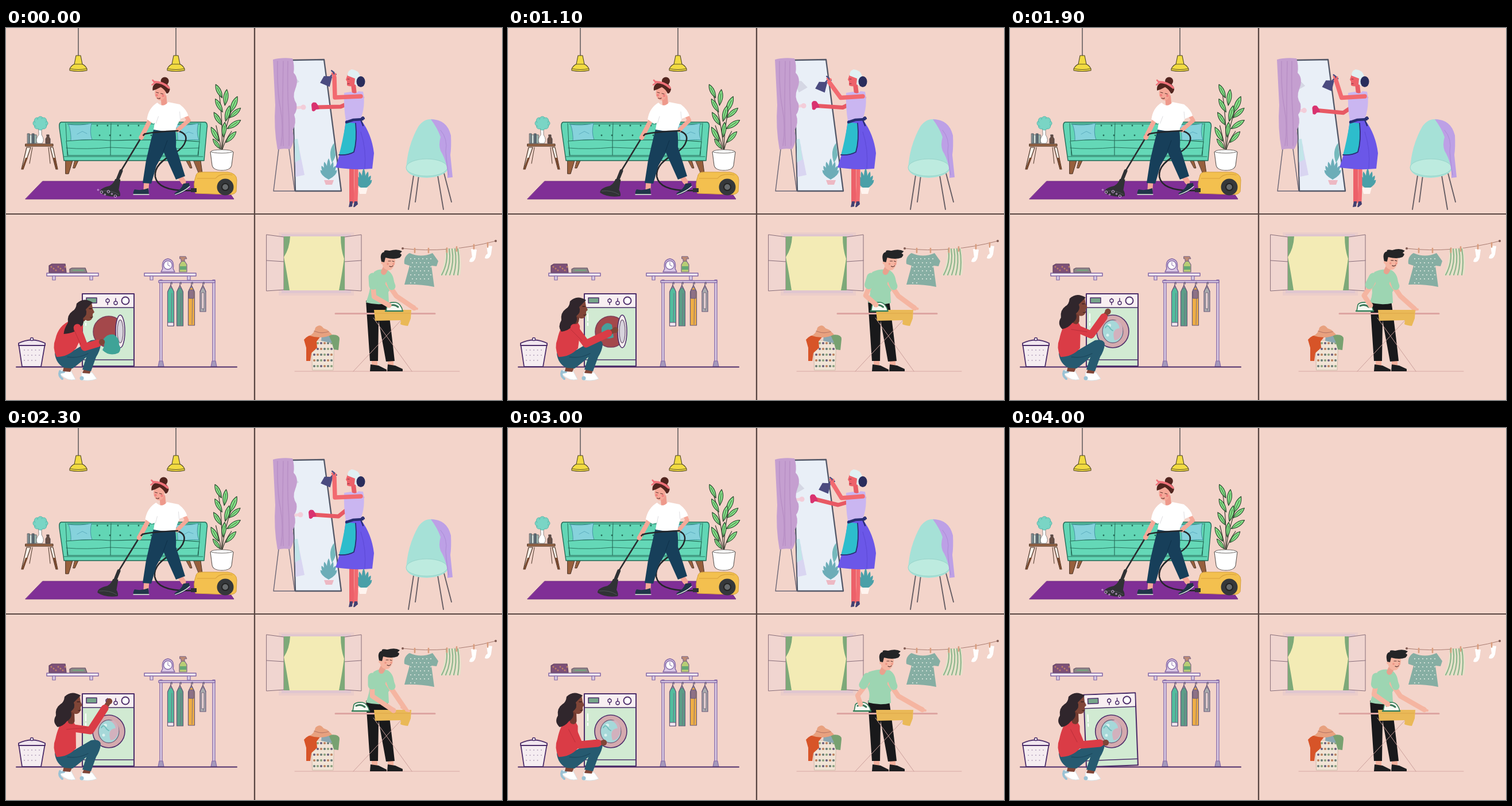
An HTML page with a canvas that plays this animation: 864x648 px, repeating every 4.1 s.

```html
<!DOCTYPE html>
<html lang="en">
<head>
<meta charset="utf-8">
<title>Housework</title>
<style>
html, body { margin: 0; width: 864px; height: 648px; overflow: hidden; background: #f3d4ca; }
canvas { display: block; }
</style>
</head>
<body>
<canvas id="stage" width="864" height="648"></canvas>
<script>
const c = document.getElementById('stage').getContext('2d');
const LOOP = 4100, STEP = 100;
const INK = '#35373c', PLUM = '#4e2f6b', LILAC = '#8468a6', SKIN = '#f5a898', NAVY = '#173f5a', MINT = '#9dd5b2';
c.lineCap = c.lineJoin = 'round';

// Drawing helpers
function path(d, fill, stroke, w = 1.2) {
  const p = new Path2D(d);
  if (fill) { c.fillStyle = fill; c.fill(p); }
  if (stroke) { c.strokeStyle = stroke; c.lineWidth = w; c.stroke(p); }
}
const line = (pts, col, w = 1.2) => path('M' + pts.join('L'), null, col, w);
const rect = (x, y, w, h, fill, stroke, sw) => path(`M${x} ${y}h${w}v${h}h${-w}Z`, fill, stroke, sw);
function oval(x, y, rx, ry, fill, stroke, w = 1.2) {
  c.beginPath();
  c.ellipse(x, y, rx, ry, 0, 0, 7);
  if (fill) { c.fillStyle = fill; c.fill(); }
  if (stroke) { c.strokeStyle = stroke; c.lineWidth = w; c.stroke(); }
}
const dot = (x, y, r, fill, stroke, w) => oval(x, y, r, r, fill, stroke, w);
function moved(x, y, draw, turn = 0) {
  c.save();
  c.translate(x, y);
  c.rotate(turn);
  draw();
  c.restore();
}
function leaf(x, y, len, turn, fill, stroke) {
  moved(x, y, () => {
    path(`M0 ${-len}Q${len * .56} ${-len * .1} 0 ${len}Q${-len * .56} ${-len * .1} 0 ${-len}Z`, fill, stroke, 1.1);
    if (stroke) line([[0, -len * .5], [0, len]], stroke, .7);
  }, turn);
}
// Slim leaves fanned out from one root
function fan(x, y, col) {
  for (let i = -3; i < 4; i++) moved(x, y, () => {
    const h = 37 - Math.abs(i) * 5;
    path(`M0 0Q-6 ${-h * .7} 0 ${-h}Q6 ${-h * .7} 0 0Z`, col);
  }, i * .24);
}
const mix = (a, b, k) => a.map((v, i) => v + (b[i] - v) * k);

// Rows are [time, ...values]
function at(t, rows) {
  let i = 0;
  while (i < rows.length - 2 && t > rows[i + 1][0]) i++;
  const [a, b] = [rows[i], rows[i + 1]];
  const k = Math.min(1, Math.max(0, (t - a[0]) / (b[0] - a[0])));
  return mix(a, b, k).slice(1);
}

function lamp(x) {
  moved(x, 0, () => {
    line([[0, 0], [0, 48]], INK, 1.2);
    path('M-4 48H4L7 63Q12 65 15 71V74Q0 77 -15 74V71Q-12 65 -7 63Z', '#f2db42', '#4c4423', 1.1);
    path('M-7 63H7M-14 71Q0 74 14 71', null, '#4c4423', .9);
  });
}

function sideTable() {
  path('M36 208H43L30 246H27ZM77 208H82L90 246H87Z', '#f7efe8', '#4b3527');
  path('M34 226H38L30 246H27ZM82 226H86L90 246H87Z', '#7a4a30');
  line([[46, 208], [41, 236]], '#4b3527', 1);
  line([[74, 208], [77, 236]], '#4b3527', 1);
  rect(34, 202, 48, 4, '#9a6746', '#4b3527', 1);
  ['#7c8d92', '#d6e5e2', '#596a75', '#9fb9b4'].forEach((col, i) =>
    rect(37.5 + i * 4, 184 + i % 2 * 2, 3.6, 17 - i % 2 * 2, col, '#4b5256', .8));
  path('M57 176H62L62 186Q68 195 63 201H55Q50 195 57 186Z', '#fff', '#71716f', .8);
  for (let i = 0; i < 8; i++) dot(60 + 8 * Math.cos(i * .785), 166 + 7 * Math.sin(i * .785), 5, '#78d3c3', '#4caea1', .7);
  dot(60, 167, 9, '#7ad5c5');
  path('M71 186H75V190L77 193V201H69V193L71 190Z', '#694f45', INK, .8);
}

function sofa() {
  const edge = '#246956', teal = '#62d6b5';
  path('M104 231H116L109 254H104ZM327 231H339L342 253H336ZM120 231H126L120 244H117ZM314 231H320L324 244H321Z', '#965f3c', '#4b3527', 1);
  path('M96 164H347Q352 166 350 175L345 231H101L93 174Q92 165 96 164Z', teal, edge, 1.4);
  path('M104 166L107 223M339 166L335 223M107 167H337M183 166L182 196', null, edge, 1);
  for (let i = 0; i < 8; i++) {
    dot(159 + i * 18, 170, 1.4, edge);
    dot(163 + i * 18, 187, 1.4, edge);
  }
  const pillow = x => path(`M${x} 168Q${x + 20} 171 ${x + 40} 166Q${x + 36} 181 ${x + 41} 195Q${x + 22} 193 ${x + 4} 199Q${x + 5} 182 ${x} 168Z`, '#86d2dc', '#4597a5', 1);
  pillow(109);
  pillow(295);
  path('M124 185l9 -5 8 4M309 186l9 -5 8 3', null, '#5daec0', 1);
  path('M105 197Q145 193 182 196V222H108ZM182 196Q285 193 337 198L334 222H182Z', '#64d8b7', edge, 1.1);
  path('M105 209Q140 212 182 208M182 208Q260 212 336 209M101 224H343', null, edge, .9);
}

function plant(t) {
  const sway = -16 * (.5 - .5 * Math.cos((t - 50) / 2050 * Math.PI * 2));
  const bend = (x, y) => [x + sway * Math.pow((213 - y) / 108, 1.3), y];
  const stem = (x, y, m) => {
    const [a, b] = bend(x, y), [p, q] = bend(m, (y + 213) / 2);
    path(`M376 214Q${p} ${q} ${a} ${b}`, null, '#3d3d32', 1.2);
  };
  stem(371, 110, 378); stem(398, 130, 381); stem(366, 170, 371); stem(393, 180, 381);
  [[371, 110, 13, -.45], [383, 121, 14, .12], [397, 133, 15, .42], [371, 135, 13, -.5],
   [386, 149, 14, .25], [399, 148, 13, .85], [369, 158, 13, -.55], [397, 168, 14, 1],
   [380, 177, 13, .1], [364, 185, 14, -.5], [392, 190, 13, .75], [367, 202, 11, -.65]]
    .forEach(([x, y, n, r]) => leaf(...bend(x, y), n, r, '#85e287', '#28462d'));
  path('M356 216Q376 209 396 216L393 239Q391 248 376 248Q361 248 359 239Z', '#fff', '#5c5653', 1.1);
  oval(376, 215, 19, 3, '#fff', '#5c5653', .9);
}

function vacuuming(t) {
  const [k] = at(t % 2050, [[0, .73], [250, .5], [600, 0], [950, .3], [1350, .98], [1600, 1], [1950, .76], [2050, .73]]);
  const s = 9 * k, hand = [224 + 16 * k, 192 - 2 * k], nx = 17 * k;
  path('M64 267H375L397 298H34Z', '#802f96', '#6b2883', 1);
  path(`M${294 + 6 * k} 179C${312 + 18 * k} 185 ${304 + 10 * k} 207 ${288 + 10 * k} 217C${266 + 8 * k} 230 ${255 + 4 * k} 242 ${257 + 4 * k} 259Q${262 + 4 * k} 286 328 283`, null, '#24262a', 2.6);

  path('M331 257Q332 251 340 251H386Q402 253 402 265L401 285Q398 291 386 290L330 288Q325 272 331 257Z', '#f3c04f', '#d49f3d', 1);
  path('M333 262H365Q372 252 394 256', null, '#d9a23c', 1.2);
  dot(382, 277, 14.5, '#35383b');
  dot(382, 277, 6, '#666a6c', '#222', 2);
  rect(322, 279, 10, 7, '#303235');

  line([[245, 265], [244, 281]], SKIN, 9);
  line([[302, 257], [309, 268]], SKIN, 9);
  path('M224 281Q235 284 248 279L249 291H222Q221 285 224 281Z', '#203649');
  path('M293 288Q306 281 309 271L319 270L320 276Q310 288 296 291Z', '#203649');
  path('M222 290H249M295 290Q310 285 320 276', null, '#f3f3ee', 1.3);
  path(`M${256 + s * .2} 176H${294 + s * .1}Q297 191 296 207L312 258L296 264L275 217L262 240L253 271L238 270L244 231Q250 204 ${256 + s * .2} 176Z`, NAVY);
  line([[274, 215], [281, 196]], '#0e3049', 1);

  line([[305 + s, 150], [308 + 14 * k, 161], [296 + 4 * k, 178]], SKIN, 7);
  line([[243 + 12 * k, 159], hand], SKIN, 8);
  moved(s, 0, () => line([[268, 120], [269, 133]], '#ee998b', 10));
  path(`M${257 + s} 130Q${267 + s} 140 ${276 + s} 129L${296 + s} 133Q${308 + s} 142 ${311 + s} 153L${298 + s} 158Q297 169 295 179Q275 181 257 177L259 165L${248 + 12 * k} 167L${236 + 13 * k} 159Q${241 + 10 * k} 139 ${257 + s} 130Z`, '#fff');
  path(`M${296 + s} 146L${297 + s} 158M${258 + s * .5} 166L${259 + s} 154`, null, '#dedde0', 1);
  moved(s, 0, () => {
    dot(270, 92.5, 7, '#52251f');
    oval(262, 113, 9.5, 13, SKIN);
    path('M249 109Q247 96 262 94Q277 95 279 107Q277 115 273 114Q270 107 263 103Q256 107 249 109Z', '#52251f');
    path('M252 94Q267 94 277 104', null, '#f0727a', 3.8);
    path('M253 95L249 91M252 96L248 99', null, '#f0727a', 2.6);
    path('M255 112l4 1M263 114l4 1M257 122q3 2 5 0', null, '#633531', 1.1);
    dot(256, 117, 2.3, '#ef817f');
    dot(267, 118, 2.3, '#ef817f');
  });
  const grip = [hand[0] + 6, hand[1] - 6], neck = [186 + nx, 252];
  path(`M${grip}Q${250 + 10 * k} 181 ${298 + 2 * k} 179`, null, '#24262a', 2.6);
  line([grip, hand, neck], '#2b2d30', 2.6);
  dot(...hand, 4.2, SKIN);
  line([[neck[0] + 2, 249], [neck[0] - 4, 264]], '#303235', 6);
  moved(nx, 0, () => {
    path('M178 263L187 264L184 282Q188 289 186 293Q165 296 151 287Q150 280 164 276Q173 275 178 263Z', '#303235');
    path('M154 284Q171 282 184 290', null, '#515459', 1);
  });
  if (k > .6) for (let i = 0; i < 6; i++)
    dot(148 + nx + i * 6, 282 + i % 3 * 3 + i, 1.2 + i % 2, null, '#d9b1e5', 1);
}

function mirror(t) {
  path('M475 211L466 284H505M493 211L503 284', null, '#686474', 1.4);
  path('M498 56L554 55L584 284H504Z', '#e9eff7', '#535868', 2.3);
  const [gx, gy, ax, ay, bx, by, hx, hy, sx, sy] = at(t, [
    [0, 537, 138, 583, 137, 573, 121, 572, 86, 560, 91],
    [600, 537, 133, 584, 134, 578, 121, 555, 94, 543, 99],
    [1600, 531, 138, 582, 143, 581, 122, 565, 96, 553, 103],
    [2300, 532, 151, 579, 154, 573, 121, 572, 86, 561, 92],
    [3000, 531, 124, 575, 134, 581, 122, 565, 96, 554, 103],
    [3400, 529, 104, 568, 123, 580, 120, 566, 96, 556, 104],
    [4000, 535, 134, 582, 136, 575, 121, 570, 88, 559, 94]]);
  c.save();
  c.clip(new Path2D('M499 57L553 56L582 283H505Z'));
  path('M500 197Q510 194 511 211L520 256L501 260Z', '#d9d5f1');
  path('M498 195L508 193L513 229L500 236Z', '#c2e5e9');
  line([[490, gy + 3], [gx - 22, gy]], '#f3d3dc', 5);
  dot(gx - 19, gy, 4.5, '#f3cdd9');
  moved(514 - (sx - 543) * .9, sy, () => path('M-8 -11L4 -8L11 6L-6 10Z', '#d5d7e4'), -.3);
  fan(562, 264, '#6cadb8');
  leaf(570, 217, 18, .12, '#75b9bc');
  path('M554 265H571L568 273H557Z', '#edb8c3');
  c.restore();
  path('M465 55Q479 51 499 53Q503 65 501 78Q511 88 504 106Q498 120 506 132Q508 143 502 151Q507 165 499 179Q504 197 495 211Q482 209 473 212Q466 174 469 134Z', '#c59fd0');
  [[473, 478], [483, 482], [491, 492]].forEach(([x, y]) =>
    path(`M${x} 58Q${x - 1} 109 ${y} 140T${y + 1} 205`, null, '#b990c6', 1.6));

  fan(623, 281, '#4aa0a8');
  path('M613 278H630L627 289H616Z', '#fff4ef');
  line([[602, 240], [602, 275], [602, 302]], '#ec6069', 8);
  line([[610, 240], [610, 275], [609, 302]], '#f26a70', 7);
  path('M599 302L604 302L603 311L597 312ZM607 302H612L613 307L607 312H605Z', '#424070');
  line([[620, 121], [ax, ay], [gx + 4, gy]], '#e85964', 7);
  path(`M${gx + 6} ${gy - 4}L${gx + 3} ${gy - 8}Q${gx - 4} ${gy - 10} ${gx - 5} ${gy - 4}L${gx - 4} ${gy + 6}Q${gx} ${gy + 9} ${gx + 3} ${gy + 4}L${gx + 9} ${gy + 3}Z`, '#d9326f');
  line([[605, 98], [607, 115]], '#e95d67', 8);
  path('M589 113L601 111Q608 117 614 110L622 111Q627 135 617 161L592 162Q588 138 589 113Z', '#cab6f1');
  path('M592 161L619 161Q637 185 641 218L638 245Q608 248 574 243L586 205Z', '#6b57e8');
  path('M618 181Q628 211 625 245', null, '#5f4cd8', 1.2);
  path('M592 164L609 166Q612 196 606 216Q596 222 580 221Q586 200 592 164Z', '#2dbdcc');
  path('M609 166Q612 196 606 216Q596 222 580 221', null, '#292f72', 1.8);
  line([[593, 164], [605, 160], [621, 159]], '#292f72', 4.5);
  path('M618 159Q622 152 624 158L618 160L622 170', null, '#292f72', 2.3);
  moved(sx, sy, () => {
    path('M-8 -5L6 -9L7 10L-11 8Z', '#4b4b80');
    path('M3 -8L7 -16L2 -18M7 -14L11 -14', null, '#4b4b80', 2.5);
  }, .3);
  line([[618, 119], [bx, by], [hx, hy]], '#f26a70', 7.5);
  path(`M${hx} ${hy}l-4 -7M${hx} ${hy}l2 -6`, null, '#f26a70', 3);
  path('M595 81L592 90L594 93L594 100Q602 104 610 98L613 86L604 77Z', '#ed626a');
  path('M595 83Q594 75 602 72Q614 73 617 84L612 101L607 98L608 88Z', '#e0f0f2');
  oval(618, 93.5, 7.5, 9.5, '#292d5c');
  path('M595 89h3M595 97h3', null, '#7e3142', 1);

  const leg = (...p) => line(p, '#675e64', 1.9);
  leg([710, 257], [701, 316]); leg([719, 257], [713, 303]);
  leg([752, 257], [762, 316]); leg([763, 253], [776, 303]);
  path('M697 246Q699 206 718 172Q728 157 745 159Q767 169 771 218L770 247Q760 260 733 261Q702 260 697 246Z', '#a6e1d7');
  oval(733, 243, 36, 15, '#bdebdf', '#98d4ca', 1);
  path('M740 159Q768 159 775 187Q776 208 774 221L778 260L769 261Q770 235 757 214Q753 203 757 190Q752 175 740 159Z', '#bda0e6');
  path('M757 178Q770 193 766 215Q768 239 771 256', null, '#ab8cd6', 1);
}

function laundryRoom() {
  path('M22 550H68L61 590H28Z', '#f5edf1', PLUM, 1.8);
  for (let i = 0; i < 14; i++) dot(32 + i % 5 * 6.5, 561 + Math.floor(i / 5) * 9, 1, '#b2a0ba');
  path('M22 553V549Q45 538 68 549V553Z', '#f1e6ef', PLUM, 1.8);
  dot(45, 542, 2.5, '#fff', PLUM, 1.5);
  const shelf = x => {
    rect(x, 427, 90, 5, '#f4eaf2', LILAC, 1.5);
    rect(x + 10, 432, 5, 7, '#d9cce4', LILAC);
    rect(x + 75, 432, 5, 7, '#d9cce4', LILAC);
  };
  shelf(71); shelf(241);
  path('M75 414L80 411H103L105 426H75Z', '#7e5078', '#5e415e');
  for (let i = 0; i < 7; i++) dot(79 + i * 4, 416 + i % 3 * 3, 1.5, '#bc8264');
  path('M111 420L115 418H138L141 426H111Z', '#8b8488', '#675566');
  path('M117 422h18', null, '#73a77d', 2);
  path('M270 425L273 419Q270 404 282 402Q294 404 291 419L294 425Z', '#d8c6e3', LILAC, 1.5);
  dot(282, 413, 7.5, '#fff', LILAC, 1.5);
  path('M282 408V413L286 415', null, LILAC, 1);
  path('M302 425V412L306 406H311L315 412V425Z', '#b7cd75', '#756385', 1.2);
  path('M303 398H313L315 402H311V406H305V402H303Z', '#bd8b75', '#756385', 1);
  rect(303, 415, 11, 6, '#64a874');

  [270, 362].forEach(x => {
    rect(x - 2, 439, 4, 143, '#dfd1e7', LILAC, 1.3);
    path(`M${x - 3} 580H${x + 3}L${x + 5} 590H${x - 5}Z`, '#a498bb', LILAC);
  });
  rect(266, 440, 98, 3.5, '#dfd1e7', LILAC, 1.3);
  [[287, 519, '#52bd9d', 11], [303, 519, '#5c9d87', 11], [323, 518, '#efae45', 11], [343, 494, '#a9aaad', 10]].forEach(([x, y, col, w]) => {
    path(`M${x} 450V444Q${x + 3} 441 ${x + 2} 446M${x} 448L${x - 5} 459M${x} 448L${x + 5} 459`, null, '#66587a', 1.4);
    path(`M${x - w / 2} 460Q${x} 444 ${x + w / 2} 460V${y}H${x - w / 2}Z`, col, '#66587a', 1.2);
    line([[x + 2, 462], [x + 1, y - 2]], '#756984', .9);
  });
  rect(282, 513, 10, 6, '#f0e7f0', '#66587a', 1);
  rect(319, 456, 8, 15, '#8d7186', '#66587a', 1);
  rect(341, 461, 4, 28, '#e5d0d2', '#766b7d', 1);
  line([[18, 590.5], [402, 590.5]], PLUM, 2);
}

function washer(t) {
  const shut = at(t, [[0, 0], [1200, 0], [1500, 1], [LOOP, 1]])[0];
  const shake = t < 3600 ? 0 : (t / STEP % 2 ? .02 : -.038);
  c.save();
  c.translate(178, 589);
  c.rotate(shake);
  c.translate(-178, -589);
  rect(133, 463, 90, 126, '#d1ead2', PLUM, 2.1);
  rect(134, 464, 88, 22, '#f8eff2');
  path('M133 487H223M134 578H223', null, PLUM, 1.5);
  path('M139 498V510M139 514V518', null, '#fff', 2);
  rect(140, 470, 18, 9, '#77a68b', PLUM, 1.5);
  [[177, 471, 475], [191, 471, 479]].forEach(([x, y, k]) => {
    line([[x, y], [x, 482]], PLUM, 1.5);
    dot(x, k, 3, '#fff', PLUM, 1.5);
  });
  dot(208, 475, 6.5, '#fff', PLUM, 2);
  dot(179, 529, 27, '#a4484b', '#7f3f5a', 1.6);
  if (t > 250 && shut < .6) path('M163 522Q171 509 181 517L184 539Q170 544 163 534Z', '#479f9b');
  const x = 199 - 20 * shut, rx = 8 + 20 * shut;
  oval(x, 528.5, rx, 28.5, shut > .5 ? '#d4aaae' : '#f5edef', PLUM, 1.6);
  oval(x, 528.5, rx * .64, 20, shut > .5 ? '#a6d8d9' : '#d7d3dc', '#76627c', 1.3);
  if (shut > .8) {
    path('M179 510Q189 512 191 523Q176 524 182 544Q189 544 193 537Q202 519 187 509Z', '#d2b1bd');
    dot(173, 518, 3, '#d9f1ef');
    dot(170, 535, 2.5, '#d9f1ef');
    path('M166 522q4 -6 7 -1t6 6', null, '#6ebdbb', 2);
  }
  c.restore();
}

function laundress(t) {
  const [hx, hy, ex, ey, px, py] = at(t, [
    [0, 17, 4, 137, 556, 167, 547], [600, 0, 0, 136, 551, 182, 532],
    [1100, 2, 0, 136, 550, 187, 526], [1600, 0, 0, 127, 553, 154, 527],
    [2000, -3, -6, 146, 528, 176, 483], [2300, -4, -8, 147, 527, 180, 476],
    [2500, -4, -8, 147, 527, 178, 478], [2900, -4, -8, 124, 552, 167, 548], [LOOP, -4, -8, 124, 552, 167, 548]]);
  const lean = hx * .6;
  path('M96 596L113 597L121 612Q108 616 95 604Z', '#fff', '#d8e3e8', 1);
  path('M94 598Q91 606 98 611M95 600l6 -1', null, '#9ac2d4', 4);
  path('M132 600H150L158 611Q146 616 131 613Z', '#fff', '#d8e3e8', 1);
  dot(132, 610, 3.5, '#9ac2d4');
  path('M101 589L115 592L112 599L99 598ZM137 592L148 595L146 602L133 601Z', '#804537');
  path('M85 567Q93 557 119 561L148 544Q164 541 165 551Q164 562 157 573L148 598L133 595L140 573Q131 582 116 593L102 592Q87 585 85 567Z', '#265a70');
  path('M107 573Q126 576 143 567', null, '#1c485d', 1.3);
  path(`M${103 + lean} 509Q${118 + lean} 505 ${124 + lean} 519Q${124 + lean} 535 122 558Q108 573 88 573Q80 556 86 542Q91 518 ${103 + lean} 509Z`, '#da3c46');
  line([[117 + hx, 501 + hy], [116 + lean, 510]], '#71392f', 12);
  moved(hx, hy, () => {
    path('M116 474L132 473L134 485L137 491L134 494Q135 507 124 506L112 498Z', '#804537');
    path(`M134 474Q118 464 106 476Q105 486 99 489Q89 496 91 509Q84 520 ${92 - hx * .5} 529Q104 527 110 519Q121 512 117 502Q126 495 122 486L128 480Z`, '#30262c');
    path('M128 485h4M130 500q3 1 4 -1', null, '#3d2021', 1.3);
  });
  if (t < 250) path('M169 543Q176 532 188 534Q198 540 197 552Q202 559 196 566Q180 573 168 561Q174 551 169 543Z', '#3fa397');
  line([mix([ex, ey], [px, py], .82), [px, py]], '#804537', 8);
  line([[114 + lean, 522], [ex, ey], mix([ex, ey], [px, py], .76)], '#da3c46', 13);
  dot(px, py, 5.2, '#804537');
  path(`M${108 + lean} 525L${ex - 7} ${ey - 5}`, null, '#bb2f3a', 1);
}

function ironingRoom() {
  rect(475, 356, 131, 110, '#ebcdca');
  rect(480, 359, 121, 103, '#e0c6cf');
  path('M454 360L484 364V456L454 458ZM454 405L484 407M590 364L619 360V458L590 456ZM590 407L619 405', '#f0d5d0', '#886d79', 1);
  rect(484, 363, 106, 94, '#7da979');
  path('M495 363H583Q583 385 589 402Q584 436 580 457H494Q489 424 484 399Q494 384 495 363Z', '#f3ebb5');

  path('M691 384Q770 393 853 371', null, '#a97c72', 1);
  dot(691, 384, 2, '#805b53');
  dot(853, 371, 2, '#805b53');
  path('M703 392Q723 401 743 392L753 406L750 415L741 414L746 451Q720 446 694 447L703 414L694 411Q692 398 703 392Z', '#86aea3');
  for (let i = 0; i < 38; i++) {
    const y = 402 + Math.floor(i / 6) * 7, x = 705 + i % 6 * 7 + Math.floor(i / 6) % 2 * 3;
    if (x < 741) dot(x, y, 1.1, '#dde8df');
  }
  path('M766 385L789 383Q795 412 791 430L756 431Q765 410 766 385Z', '#e7e2cb');
  for (let i = 0; i < 5; i++) path(`M${767 + i * 5} 385Q${771 + i * 5} 408 ${759 + i * 7} 430`, null, '#8db58c', 2.1);
  [[814, 385], [841, 379]].forEach(([x, y]) =>
    path(`M${x - 4} ${y}L${x + 6} ${y + 1}L${x + 4} ${y + 15}Q${x + 1} ${y + 25} ${x - 7} ${y + 22}Q${x - 6} ${y + 16} ${x - 2} ${y + 14}Z`, '#fff'));
  [712, 736, 768, 785, 815, 839].forEach(x => {
    const y = 387 - Math.max(0, x - 765) * .13;
    line([[x, y - 3], [x, y + 4]], '#d99d7e', 2.6);
  });

  line([[503, 598], [790, 598]], '#d8aaa5', 1);
  path('M532 544H572L570 596H534Z', '#f1e4d6', '#d1bdab', 1);
  const tones = ['#6b7d77', '#ba815f', '#6c607d', '#8aa17d'];
  for (let i = 0; i < 30; i++) dot(537 + i % 6 * 6, 549 + Math.floor(i / 6) * 10, 2.1, tones[(i * 3 + Math.floor(i / 6)) % 4]);
  path('M550 535Q566 527 571 541L569 549L549 545Z', '#8ba7b1');
  path('M562 535Q581 532 581 542L579 561L571 560L567 546Z', '#78a171');
  path('M519 543Q528 531 549 536L541 546L542 557L532 566L530 580L523 580V557Z', '#d75428');
  path('M529 536Q537 532 539 522Q547 514 553 523L560 526L568 534Q550 543 529 536Z', '#e8a17f');
  path('M537 528Q549 533 562 529', null, '#b87866', 1.3);
}

function ironing(t) {
  const [ix, hx, hy, sx, ex, ey, px, py, rx, ry] = at(t, [
    [0, 676, 0, 0, 639, 641, 468, 667, 483, 711, 488], [600, 675, -1, 0, 639, 641, 468, 667, 482, 709, 488],
    [1600, 618, 0, 0, 626, 605, 464, 615, 482, 708, 488], [1850, 618, -2, -1, 632, 614, 466, 622, 482, 706, 489],
    [2300, 618, -4, -2, 638, 638, 467, 675, 492, 697, 492],
    [2700, 618, -5, 0, 632, 616, 466, 618, 482, 718, 490], [3000, 617, -6, 0, 626, 609, 466, 614, 481, 722, 491],
    [3400, 627, 0, 0, 626, 606, 461, 623, 483, 724, 491], [4000, 664, 3, 0, 638, 634, 464, 658, 481, 722, 491], [LOOP, 676, 0, 0, 639, 641, 468, 667, 483, 711, 488]]);
  path('M637 574H647V589H637ZM665 574H675V589H665Z', '#f2b09c');
  path('M635 586L649 588L663 595V598H634ZM665 586L678 588L691 594V598H664Z', '#1d1e20');
  path('M627 475H664Q670 516 677 580L662 581L649 510L648 580H634Q630 520 627 475Z', '#19191b');
  path('M605 598L692 505M707 598L640 505', null, '#cb9f9b', 1);
  path(`M${sx + 2} 425Q650 418 665 422Q676 429 676 446L666 460L667 479Q648 484 627 478Q634 460 ${sx - 4} 446Z`, MINT);
  line([[665, 445], [680, 467], [rx, ry]], '#f5b5a1', 8.5);
  line([[667, 436], [672, 450]], MINT, 13);

  line([[574, 497.5], [747, 497.5]], '#dda5a2', 3);
  path('M641 491H706L705 506L700 519Q691 518 687 516L688 509L643 510Z', '#eab957');
  line([[643, 497], [704, 497]], '#dda648', 1);
  path(`M${rx} ${ry - 3}l-8 -2M${rx} ${ry}l5 1`, null, '#f5b5a1', 4);

  moved(ix, 486, () => {
    path('M-14 7L-12 -4Q-9 -9 3 -8Q12 -6 15 7Z', '#f6f8f2', '#347e58', 1.6);
    path('M-8 -2Q0 -6 7 0', null, '#397657', 3);
    line([[-15, 7], [15, 7]], '#347e58', 2.5);
  });
  line([[sx, 444], [ex, ey], [px, py]], '#f5b5a1', 8.5);
  line([[sx, 434], mix([sx, 434], [ex, ey], .42)], MINT, 15);
  dot(px, py, 4.5, '#f5b5a1');
  moved(hx, hy, () => {
    line([[662, 417], [658, 425]], '#e9a18e', 10);
    path('M656 399L677 398Q681 411 671 421Q661 425 656 414Z', '#f5b5a1');
    dot(656, 409, 2.8, '#f5b5a1');
    path('M654 407Q650 392 659 390Q657 386 668 388Q682 384 690 389L686 393Q692 394 686 400Q676 404 661 400L659 408Z', '#232426');
    path('M666 406l4 0M673 406l3 1M668 415q4 2 6 -1', null, '#5d3835', 1.2);
    dot(665, 411, 1.8, '#ec9584');
    dot(675, 411, 1.8, '#ec9584');
  });
}

function draw(now) {
  const t = Math.floor(now % LOOP / STEP) * STEP;
  c.fillStyle = '#f3d4ca';
  c.fillRect(0, 0, 864, 648);
  lamp(126);
  lamp(296);
  sideTable();
  sofa();
  plant(t);
  vacuuming(t);
  if (t < 4000) mirror(t);
  laundryRoom();
  washer(t);
  laundress(t);
  ironingRoom();
  ironing(t);
  line([[433, 0], [433, 648]], '#584541', 2.3);
  line([[0, 324], [864, 324]], '#584541', 2);
}

const start = performance.now();
function tick() {
  draw(performance.now() - start);
  requestAnimationFrame(tick);
}
tick();
</script>
</body>
</html>
```
